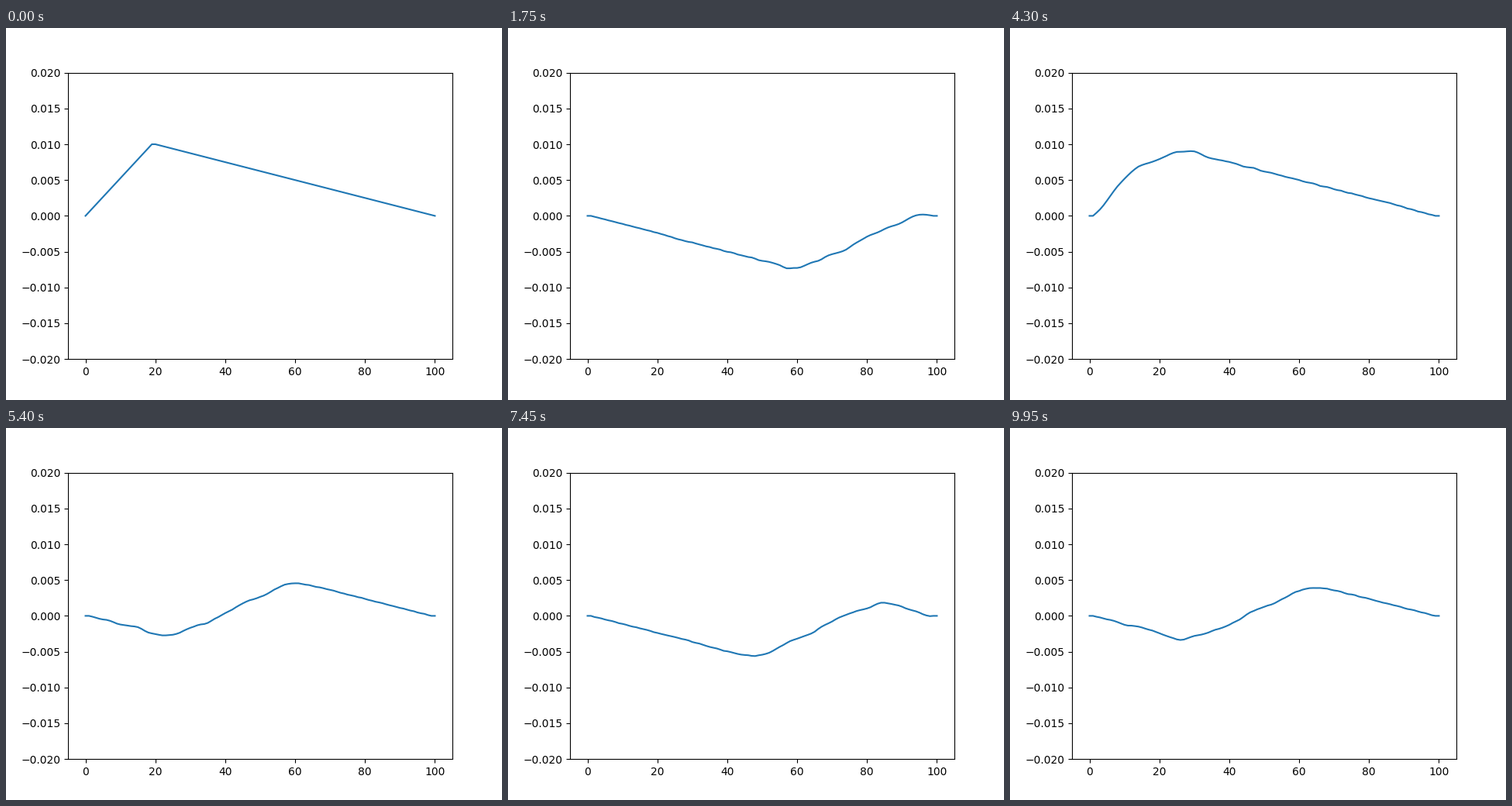
Write a matplotlib script that moves like this. It is 640 px wide and 480 px high and loops after 10 s.

```python
import numpy as np
import matplotlib.pyplot as plt
from matplotlib.animation import FuncAnimation

# Plucked string with stiffness and damping
POINTS = 101
LENGTH = 0.7
PITCH = 110
STIFFNESS = 2e-6
DAMPING = 2.6e-5
DT = 5e-6

FRAMES = 200
INTERVAL = 50
STEPS_PER_FRAME = 20

dx = LENGTH / (POINTS - 1)
speed = 2 * LENGTH * PITCH


def pluck():
    rise = np.linspace(0, 0.01, 20)
    fall = np.linspace(0.01, 0, POINTS - 20)
    return np.concatenate([rise, fall])


def step(prev, cur):
    """Advance one time step; the two outermost points at each end stay at rest."""
    inertia = 1 / (speed * DT) ** 2
    drag = DAMPING / (2 * DT)
    mid = cur[2:-2]
    left, right = cur[1:-3], cur[3:-1]
    tension = (left - 2 * mid + right) / dx**2
    bending = (cur[4:] - 4 * right + 6 * mid - 4 * left + cur[:-4]) * STIFFNESS**2 / dx**4
    old = prev[2:-2]
    nxt = np.zeros(POINTS)
    nxt[2:-2] = (tension - bending + inertia * (2 * mid - old) + drag * old) / (inertia + drag)
    return nxt


def simulate():
    prev, cur = pluck(), pluck()
    shapes = []
    for n in range(FRAMES * STEPS_PER_FRAME):
        if n % STEPS_PER_FRAME == 0:
            shapes.append(prev)
        prev, cur = cur, step(prev, cur)
    return shapes


shapes = simulate()

fig, ax = plt.subplots(figsize=(6.4, 4.8), dpi=100)
line, = ax.plot(shapes[0])
ax.set_ylim(-0.02, 0.02)


def update(i):
    line.set_ydata(shapes[i])
    return line,


anim = FuncAnimation(fig, update, frames=FRAMES, interval=INTERVAL, repeat=True, repeat_delay=0)
plt.show()
```
